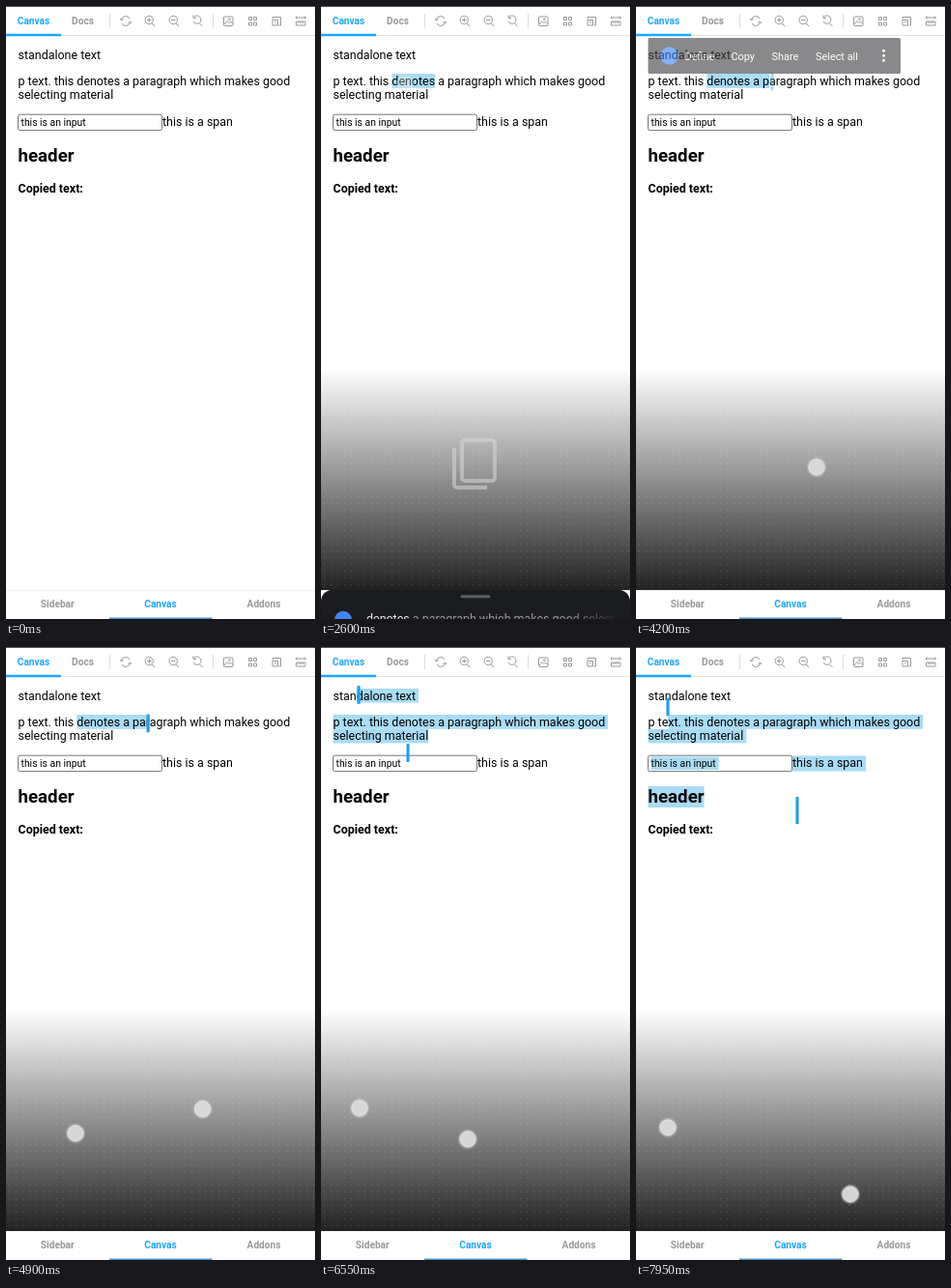
Recreate the animation shown at these times as an HTML page. Size 320 by 634 pixels, loop 8000 ms.

```html
<!DOCTYPE html>
<html lang="en">
<head>
<meta charset="utf-8">
<title>Text selection pad</title>
<style>
  html, body { margin: 0; height: 100%; overflow: hidden; background: #fff; }
  svg { display: block; font-family: Roboto, sans-serif; font-size: 12.46px; }
  .bold { font-weight: 700; }
  .tab { font-weight: 700; font-size: 10.12px; fill: #999; text-anchor: middle; }
  .on { fill: #1ea7fd; }
  .small { font-size: 10.9px; }
  .icon { fill: none; stroke: #999; stroke-width: 1; }
  .chip { fill: none; stroke: #5c5f63; }
  .chipText { font-size: 10.9px; font-weight: 500; letter-spacing: .15px; fill: #e4e6e9; }
</style>
</head>
<body>
<svg width="320" height="634" viewBox="0 0 320 634">
  <defs>
    <linearGradient id="shade" x2="0" y2="1">
      <stop offset="0" stop-opacity="0"/>
      <stop offset="1" stop-opacity=".87"/>
    </linearGradient>
    <linearGradient id="fadeText" gradientUnits="userSpaceOnUse" x1="255" x2="308">
      <stop offset="0" stop-color="#999"/>
      <stop offset="1" stop-color="#999" stop-opacity="0"/>
    </linearGradient>
    <pattern id="dots" width="7" height="7" patternUnits="userSpaceOnUse">
      <circle cx="3.5" cy="3.5" r=".7" fill="#fff" fill-opacity=".13"/>
    </pattern>
    <g id="finger">
      <circle r="10.5" fill="#dcdcf4" fill-opacity=".25"/>
      <circle r="8.3" fill="#dadada" fill-opacity=".95" stroke="#e9e9ee" stroke-width=".8"/>
    </g>
  </defs>
  <rect width="320" height="634" fill="#fff"/>

  <g id="marks" fill="#a9dcf5"></g>
  <rect x="12.5" y="112.2" width="149" height="16.4" rx="2" fill="none" stroke="#767676"/>
  <g id="page">
    <text x="12.5" y="54.6">standalone text</text>
    <text x="12.5" y="81.6">p text. this denotes a paragraph which makes good</text>
    <text x="12.5" y="96.2">selecting material</text>
    <text x="15.5" y="124" font-size="10.38">this is an input</text>
    <text x="162" y="123.8">this is a span</text>
    <text x="12.5" y="161.3" font-size="18.7" class="bold">header</text>
    <text x="12.5" y="192.8" class="bold">Copied text:</text>
  </g>

  <g id="handles" fill="#8fbce3" fill-opacity=".95">
    <path d="M74 84v9a9 9 0 1 1-9-9z"/>
    <path d="M117.500 84v9a9 9 0 1 0 9-9z"/>
  </g>

  <g id="pad">
    <rect y="375" width="320" height="229" fill="url(#shade)"/>
    <rect y="400" width="320" height="204" fill="url(#dots)"/>
    <g id="copyIcon" fill="none" stroke="#d8d8d8" stroke-width="4">
      <rect x="146" y="449" width="34" height="42" rx="3"/>
      <path d="M138 457v38a3 3 0 0 0 3 3h31"/>
    </g>
  </g>

  <rect width="320" height="30" fill="#fff"/>
  <path d="M0 .5H320" stroke="#555"/>
  <path d="M0 30.500H320" stroke="#e4e4e4"/>
  <path d="M0 30H57" stroke="#1ea7fd" stroke-width="2.3"/>
  <text class="tab on" x="28.500" y="19">Canvas</text>
  <text class="tab" x="79.500" y="19">Docs</text>
  <path d="M107.500 8v15M214.500 8v15" stroke="#ddd"/>
  <g class="icon">
    <path d="M119.500 14.500a4.500 4.500 0 0 1 8.500-1.500M128.500 16.500a4.500 4.500 0 0 1-8.500 1.500M118 13l1.500 2 2-1.500M130 18l-1.500-2-2 1.500"/>
    <path d="M151 18l3 3M146 14.500h4.500M148.250 12.250v4.500"/>
    <circle cx="148.250" cy="14.500" r="4.200"/>
    <path d="M176 18l3 3M171 14.500h4.500"/>
    <circle cx="173.250" cy="14.500" r="4.200"/>
    <path d="M200.500 18l3 3M194.500 11.500a4.200 4.200 0 1 1-.5 4.500M194 9.500v3h3"/>
    <rect x="225.500" y="11" width="9.500" height="9.500" rx="1"/>
    <path d="M226 19l3-3.500 2 2 1.500-1.500 2.500 2.500"/>
    <circle cx="231.500" cy="13.700" r=".9"/>
    <path d="M251.500 11.500h3v3h-3zM256.500 11.500h3v3h-3zM251.500 17h3v3h-3zM256.500 17h3v3h-3z"/>
    <path d="M276 13.500v-2h8.500v8.500h-2M276 14.500h5.500v5.500H276zM278 16.500h1.500"/>
    <path d="M300 12h10.500M301.500 10.500l-1.500 1.500 1.500 1.500M309 10.500l1.500 1.500-1.500 1.500M300.500 16h9.500v4h-9.500zM303 16v2M305.250 16v2M307.500 16v2"/>
  </g>

  <rect y="604" width="320" height="30" fill="#fff"/>
  <path d="M0 604.500H320" stroke="#f0f0f0"/>
  <text class="tab" x="53.300" y="622">Sidebar</text>
  <text class="tab on" x="160" y="622">Canvas</text>
  <text class="tab" x="267" y="622">Addons</text>
  <path d="M107 633.200h106.500" stroke="#4f93c8" stroke-width="1.600"/>

  <g id="bars" fill="#1ea0ee"><rect width="3.1"/><rect width="3.1"/></g>

  <g id="toolbar">
    <rect x="12.500" y="33" width="261.500" height="37" rx="1.500" fill="#464749"/>
    <circle cx="34.500" cy="51.500" r="9.300" fill="#4285f4"/>
    <g class="small" fill="#fff">
      <text x="50.500" y="55.500">Define</text>
      <text x="98.500" y="55.500">Copy</text>
      <text x="140.500" y="55.500">Share</text>
      <text x="186" y="55.500">Select all</text>
    </g>
    <path d="M256.500 46.300h0M256.500 51.300h0M256.500 56.300h0" stroke="#fff" stroke-width="3" stroke-linecap="round"/>
  </g>

  <g id="sheet">
    <path d="M0 100V12A12 12 0 0 1 12 0H308a12 12 0 0 1 12 12V100z" fill="#1b1c1f"/>
    <path d="M146 7h28" stroke="#5b5d60" stroke-width="3" stroke-linecap="round"/>
    <g id="query">
      <circle cx="23" cy="31" r="9" fill="#4285f4"/>
      <text x="47" y="34" fill="url(#fadeText)"><tspan fill="#eee">denotes</tspan> a paragraph which makes good select</text>
    </g>
    <g id="answer">
      <path d="M9 47a14.500 15 0 0 1 29 0z" fill="#7fb8d4"/>
      <path d="M17 47V38l6.500 2 6.500-2v9h-4v-4h-5v4z" fill="#23313b"/>
      <path d="M15 22q8 5 17 0M18 25.500q5 3 11 0" fill="none" stroke="#6fa9c4" stroke-dasharray="1.200 2"/>
      <text x="47" y="30.500" fill="#93969a">denote · /dəˈnōt/</text>
      <text x="47" y="45" class="small" fill="#b4b6b9">verb · be a sign of; indicate.</text>
      <rect class="chip" x="12.500" y="60" width="106" height="24.500" rx="6"/>
      <rect class="chip" x="125.500" y="60" width="130" height="24.500" rx="6"/>
      <rect class="chip" x="262.500" y="60" width="112" height="24.500" rx="6"/>
      <text class="chipText" x="25" y="76">denote · /dəˈnōt/</text>
      <text class="chipText" x="138" y="76">denote in a sentence</text>
      <text class="chipText" x="275" y="76">denote synonyms</text>
    </g>
  </g>

  <g id="fingers">
    <use href="#finger"/><use href="#finger"/>
    <circle cx="87" cy="80" r="8.500" fill="#efefef" stroke="#ddd"/>
  </g>
</svg>
<script>
const LOOP = 8000;
const $ = id => document.getElementById(id);
const texts = [...$('page').children];
const [leftBar, rightBar] = $('bars').children;
const [leftFinger, rightFinger, press] = $('fingers').children;

// top and height of each selectable line
const lines = [[43, 14.6], [70, 14.8], [84.8, 14.6], [113.5, 13.5], [112.5, 16], [144, 22]]
  .map(([top, height], i) => ({ el: texts[i], x: +texts[i].getAttribute('x'), size: texts[i].textContent.length, top, height }));
const marks = lines.map(({ top, height }) => {
  const mark = document.createElementNS('http://www.w3.org/2000/svg', 'rect');
  mark.setAttribute('y', top);
  mark.setAttribute('height', height);
  return $('marks').appendChild(mark);
});

// rows: time, finger x, finger y, caret bar x, caret bar y
const leftPath = [
  [4900, 72, 503, 73.5, 75], [5600, 65, 500, 66, 70.5], [6100, 51, 487, 52, 59],
  [6550, 40, 477, 39, 49.5], [7100, 36, 482, 36, 52], [7950, 33, 497, 33, 62]
];
const rightPath = [
  [3950, 164, 477, 118, 78], [4200, 187, 477, 141, 78], [5000, 206, 478, 148, 79],
  [5600, 198, 485, 138, 86.5], [6550, 152, 509, 90, 109.5], [7550, 204, 540, 146, 143], [7950, 222, 566, 167, 169]
];
const sheetPath = [[2500, 634], [2600, 604], [2700, 588], [2950, 588], [3150, 549], [3850, 549], [4050, 636]];

function track(path, t) {
  if (t <= path[0][0]) return path[0].slice(1);
  const next = path.findIndex(key => key[0] > t);
  if (next < 0) return path.at(-1).slice(1);
  const a = path[next - 1], b = path[next];
  const k = (t - a[0]) / (b[0] - a[0]);
  return a.slice(1).map((v, i) => v + (b[i + 1] - v) * k);
}

const ramp = (t, from, to) => Math.min(1, Math.max(0, (t - from) / (to - from)));
const show = (el, opacity) => el.setAttribute('opacity', opacity);
const place = (el, x, y) => el.setAttribute('transform', `translate(${x} ${y})`);
const edge = ({ el, x }, n) => x + (n ? el.getSubStringLength(0, n) : 0);

function nearest(line, x) {
  let n = 0;
  while (n < line.size && (edge(line, n) + edge(line, n + 1)) / 2 < x) n++;
  return n;
}

function locate(x, y) {
  const at = i => [i, nearest(lines[i], x)];
  const end = i => [i, lines[i].size];
  if (y < 57.6) return at(0);
  if (y < 84.8) return at(1);
  if (y < 99.4) return at(2);
  if (y < 112) return end(2);
  if (y < 130) return x < 162 ? end(3) : at(4);
  if (y < 144) return end(4);
  return y < 166 ? at(5) : end(5);
}

function select([first, from], [last, to], visible) {
  lines.forEach((line, i) => {
    const inside = visible && i >= first && i <= last;
    const x0 = edge(line, i === first ? from : 0);
    const x1 = i === last ? edge(line, to) : edge(line, line.size) + 3;
    marks[i].setAttribute('x', x0);
    marks[i].setAttribute('width', inside ? Math.max(0, x1 - x0) : 0);
  });
}

function setBar(bar, x, y, row, opacity) {
  const height = row === 5 ? 28 : 18.7;
  bar.setAttribute('x', x - 1.55);
  bar.setAttribute('y', y - height / 2);
  bar.setAttribute('height', height);
  show(bar, opacity);
}

function draw(t) {
  const [lx, ly, lbx, lby] = track(leftPath, t);
  const [rx, ry, rbx, rby] = track(rightPath, t);
  const start = locate(lbx, lby), end = locate(rbx, rby);
  select(start, end, t >= 2500);
  setBar(leftBar, lbx, lby, start[0], ramp(t, 4900, 5050));
  setBar(rightBar, rbx, rby, end[0], ramp(t, 4120, 4320));
  place(leftFinger, lx, ly);
  place(rightFinger, rx, ry);
  show(leftFinger, +(t >= 4900));
  show(rightFinger, +(t >= 3950));
  show(press, .7 * ramp(t, 2000, 2080) * (1 - ramp(t, 2500, 2700)));

  show($('pad'), ramp(t, 2450, 2600));
  show($('copyIcon'), .55 * (1 - ramp(t, 2600, 3000)));
  show($('handles'), ramp(t, 2750, 2850) * (1 - ramp(t, 3950, 4050)));
  show($('toolbar'), ramp(t, 2750, 2900) * (1 - ramp(t, 4100, 4350) * .9) * (t < 4350));
  place($('sheet'), 0, track(sheetPath, t)[0]);
  show($('sheet'), +(t >= 2500 && t < 4050));
  show($('query'), 1 - ramp(t, 2900, 3050));
  show($('answer'), ramp(t, 2980, 3180));
}

function tick() {
  draw(performance.now() % LOOP);
  requestAnimationFrame(tick);
}
tick();
</script>
</body>
</html>
```
